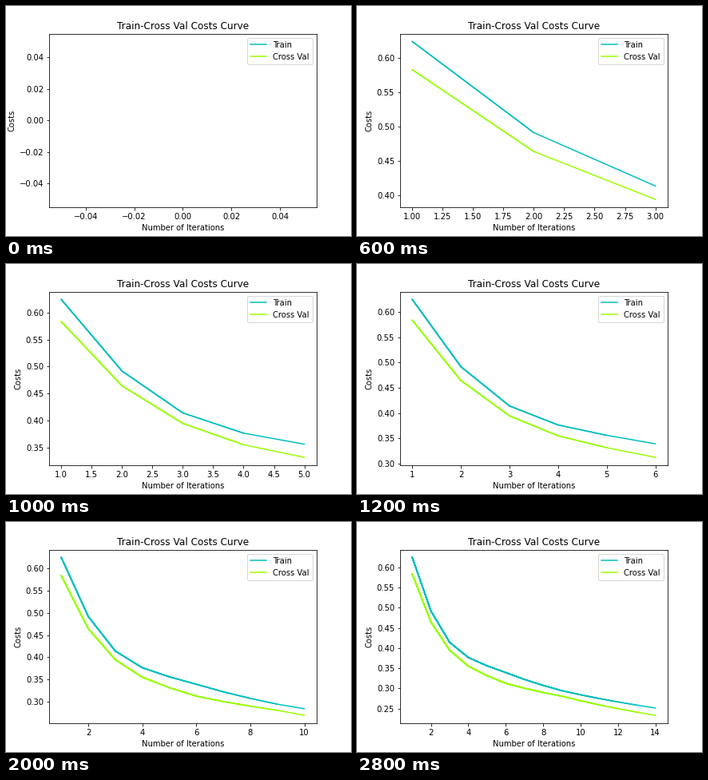
A matplotlib script for the animation above (3000 ms loop, 432x288 px).

```python
import matplotlib.pyplot as plt
import numpy as np
from matplotlib.animation import FuncAnimation

FRAMES = 15
INTERVAL = 200

# Costs fall along straight pieces of a logarithmic iteration axis.
KNOTS = [1, 3, 4, 6, 9, 14]
CURVES = [
    ("Train", "#00bfbf", [0.6243, 0.414, 0.3765, 0.3393, 0.2945, 0.2515]),
    ("Cross Val", "#99ff00", [0.5832, 0.3945, 0.355, 0.3125, 0.2807, 0.2333]),
]

plt.rcParams.update({"font.family": "DejaVu Sans", "font.size": 10})
fig, ax = plt.subplots(figsize=(6, 4), dpi=72)
fig.subplots_adjust(left=0.125, right=0.9, bottom=0.125, top=0.88)


def cost(steps, levels):
    return np.interp(np.log(steps), np.log(KNOTS), levels)


def draw(count):
    ax.clear()
    # Every shorter run stays underneath, so older segments look heavier.
    for n in range(count + 1):
        steps = np.arange(1, n + 1)
        for name, color, levels in CURVES:
            ax.plot(steps, cost(steps, levels), color=color, linewidth=1.5,
                    label=name if n == 0 else None)
    ax.set_title("Train-Cross Val Costs Curve")
    ax.set_xlabel("Number of Iterations")
    ax.set_ylabel("Costs")
    ax.legend(loc="upper right")
    return ax.lines


anim = FuncAnimation(fig, draw, frames=FRAMES, init_func=lambda: draw(0),
                     interval=INTERVAL, repeat=True, repeat_delay=0)
plt.show()
```
